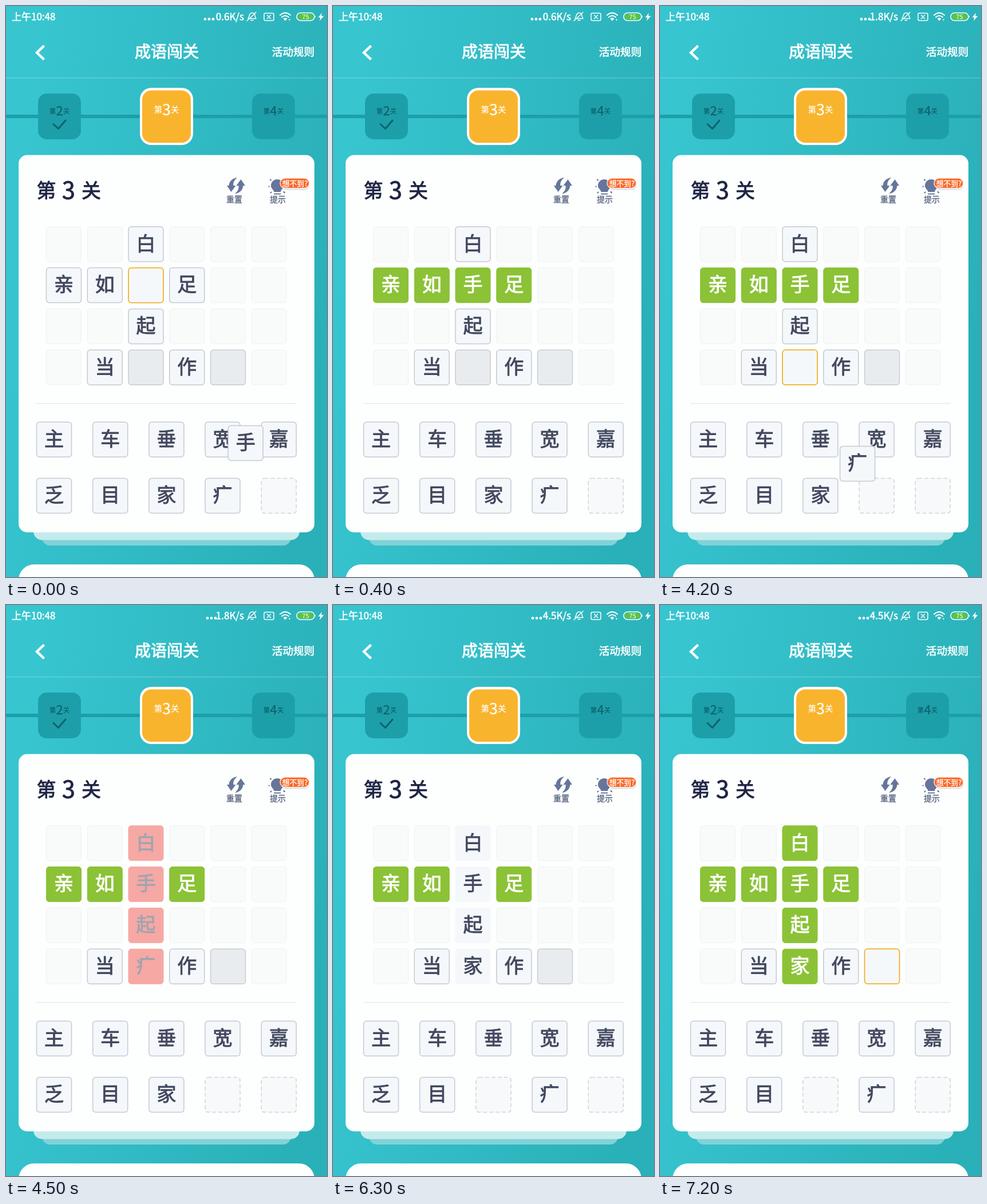
Animation of 561 by 998 pixels, one loop 8 s. Source, as an HTML page:

```html
<!DOCTYPE html>
<html lang="zh-CN">
<head>
<meta charset="utf-8">
<title>成语闯关</title>
<style>
html, body { margin: 0; width: 100%; height: 100%; overflow: hidden; background: #31bbc5; }
svg { display: block; width: 100vw; height: 100vh; }
text { font-family: "Noto Sans CJK SC", "Noto Sans CJK", "Noto Sans SC", sans-serif; font-weight: 400; }
.mid { text-anchor: middle; }
.medium { stroke: currentColor; fill: currentColor; stroke-width: .6; }
.glyph { font-size: 34px; text-anchor: middle; stroke-width: .9; }
.line { fill: none; stroke-linecap: round; stroke-linejoin: round; }
</style>
</head>
<body>
<svg viewBox="0 0 561 998" preserveAspectRatio="none">
  <defs>
    <linearGradient id="sea" gradientUnits="userSpaceOnUse" x1="0" y1="460" x2="561" y2="540">
      <stop offset="0" stop-color="#37c5d0"/>
      <stop offset="1" stop-color="#2ab0b8"/>
    </linearGradient>
    <path id="arrow" d="M404 300C395 301 390 307 389.500 314H386L393.500 325 401.500 314H397.500C396.500 309 399 304 404 300Z"/>
  </defs>
  <rect width="561" height="998" fill="url(#sea)"/>

  <!-- status bar -->
  <g fill="#fff" color="#fff">
    <text class="medium" x="10" y="25" font-size="17" stroke-width=".3">上午10:48</text>
    <g id="dots"><circle cx="348" cy="23" r="2.400"/><circle cx="355" cy="23" r="2.400"/><circle cx="362" cy="23" r="2.400"/></g>
    <text id="speed" class="medium" x="416" y="25" font-size="17" text-anchor="end">0.6K/s</text>
    <g class="line" stroke="#fff" stroke-width="1.500">
      <path d="M423 22C426 19 424 12 430 12S434 18 437 22ZM428 25H432M421 26L437 11"/>
      <rect x="451" y="12.500" width="17" height="13" rx="2.500"/>
      <path d="M456.500 16L462.500 22M462.500 16L456.500 22"/>
      <path d="M479 16Q488 8 497 16M482 19.500Q488 14.500 494 19.500" stroke-width="2"/>
      <rect x="508" y="12" width="31" height="13.500" rx="6.700"/>
    </g>
    <path d="M484.500 22Q488 19 491.500 22L488 26ZM540 16.500Q542 18.700 540 21ZM552 12L545.500 20H549.500L548 26 555.500 17.500H551Z"/>
    <path d="M494 23L495.500 26 497 23Z"/>
    <rect x="510" y="14" width="27" height="9.500" rx="4.700" fill="#5cc53a"/>
    <text class="mid" x="523.500" y="23" font-size="11" font-weight="700">75</text>
  </g>

  <!-- header -->
  <g fill="#fff" color="#fff">
    <path class="line" d="M66.500 69.500L54 81.500 66.500 93.500" stroke="#fff" stroke-width="4.500" style="stroke-linecap:butt;stroke-linejoin:miter"/>
    <text class="medium mid" x="281" y="90" font-size="28" style="stroke-width:.9">成语闯关</text>
    <text class="medium mid" x="502" y="87" font-size="18.600">活动规则</text>
    <rect y="125" width="561" height="1.300" opacity=".25"/>
  </g>

  <!-- levels -->
  <g fill="#1d9fa9">
    <rect y="190" width="561" height="6"/>
    <rect x="56" y="153" width="75" height="80" rx="15"/>
    <rect x="430" y="153" width="75" height="80" rx="15"/>
  </g>
  <rect x="234" y="143" width="93" height="100" rx="20" fill="#fff"/>
  <rect x="238" y="147.500" width="85" height="91.500" rx="16" fill="#f9b42d"/>
  <g id="levels"></g>
  <path class="line" d="M83 206.500L91.500 214.500 104 200" stroke="#0d626c" stroke-width="3"/>

  <!-- cards -->
  <rect x="63" y="900" width="435" height="43" rx="14" fill="#80d2d7"/>
  <rect x="48" y="890" width="465" height="43.500" rx="15" fill="#c4ebec"/>
  <rect x="22" y="260.500" width="517" height="659.500" rx="15" fill="#fdfffe"/>
  <rect x="22" y="976" width="517" height="60" rx="27" fill="#fdfffe"/>

  <g color="#1f2544" class="mid">
    <text class="medium" x="70.500" y="334.500" font-size="34" style="stroke-width:.9">第</text>
    <text class="medium" x="109.500" y="336.500" font-size="41" style="stroke-width:.9">3</text>
    <text class="medium" x="149" y="334.500" font-size="34" style="stroke-width:.9">关</text>
  </g>

  <g fill="#66759a">
    <use href="#arrow"/>
    <use href="#arrow" transform="rotate(180 402 314)"/>
    <path d="M463 314A11 11 0 0 1 485 314C485 319 480.500 321 480 325H468.500C468 321 463 319 463 314Z"/>
    <path class="line" d="M469 328.500H479.500M460 315.500H459.500M463 304.500L462 303.500M463.500 325.500L462.500 326.500M485.500 325L487 326" stroke="#66759a" stroke-width="2.200"/>
  </g>
  <g color="#56617f" class="mid">
    <text class="medium" x="399" y="343" font-size="14" style="stroke-width:.3">重置</text>
    <text class="medium" x="475" y="343" font-size="14" style="stroke-width:.3">提示</text>
  </g>
  <rect x="480" y="303.500" width="51" height="18" rx="9" fill="#5a6480" opacity=".18"/>
  <rect x="479" y="301" width="51" height="17.500" rx="8.700" fill="#fa6826" stroke="#fff" stroke-width="1.200"/>
  <text class="medium mid" x="505" y="314.500" font-size="12.800" color="#fff" style="stroke-width:.3">想不到?</text>

  <rect x="53" y="694" width="455" height="1.300" fill="#e4e7e9"/>
  <g id="board"></g>
</svg>

<script>
const LOOP = 8000, STEP = 100;
const INK = '#43485f', PAPER = '#f5f8fb', GREEN = '#8bc236', RED = '#f6584c';
const SIZE = 61;
const $ = id => document.getElementById(id);

const grid = ['  白   ', '亲如.足  ', '  起   ', ' 当.作. '];
const tray = '主车垂宽嘉乏目家疒手';
const cellAt = i => [101 + i % 6 * 71.76, 416.3 + Math.floor(i / 6) * 71.8];
const slotAt = i => [84 + i % 5 * 98.2, 757.8 + Math.floor(i / 5) * 98.2];

// Each move: a tile leaves its slot, fills a cell and judges a line of cells.
const moves = [
  { start: 0, slot: 9, cell: 8, line: [6, 7, 8, 9], color: GREEN },
  { start: 4200, slot: 8, cell: 20, line: [2, 8, 14, 20], color: RED, back: 5300 },
  { start: 6100, slot: 7, cell: 20, line: [2, 8, 14, 20], color: GREEN }
];
const picks = [[0, 8], [1400, 20], [7200, 22]];
const speeds = [[0, '0.6K/s', 0], [2100, '1.8K/s', 4], [6100, '4.5K/s', 1]];
const flight = [.25, .75];

const latest = (list, t) => list.filter(e => e[0] <= t).pop();

function mix(a, b, k) {
  const part = (c, i) => parseInt(c.substr(i, 2), 16);
  return `rgb(${[1, 3, 5].map(i => Math.round(part(a, i) + (part(b, i) - part(a, i)) * k))})`;
}

const looks = {
  empty: ['#f9fbfa', '#f1f3f3', 1.2],
  tile: [PAPER, '#c5c9d2', 1.5],
  blank: ['#e9ecef', '#c8ccd3', 1.5],
  pick: [PAPER, '#f4b02c', 1.8],
  hole: ['#f7f9fa', '#d0d3d9', 1.5, '7 4']
};

function tile([x, y], look, ch = '', ink = INK) {
  const [fill, stroke, width, dash = 'none'] = look;
  const box = `<rect x="${x - SIZE / 2}" y="${y - SIZE / 2}" width="${SIZE}" height="${SIZE}" rx="5"
    fill="${fill}" stroke="${stroke}" stroke-width="${width}" stroke-dasharray="${dash}"/>`;
  return ch ? box + `<text class="glyph" x="${x}" y="${y + 11.3}" fill="${ink}" stroke="${ink}">${ch}</text>` : box;
}

function draw(t) {
  const cells = [...grid.join('')].map(ch =>
    ch === ' ' ? [looks.empty] : ch === '.' ? [looks.blank] : [looks.tile, ch]);
  const slots = [...tray].map(ch => [looks.tile, ch]);
  const pick = latest(picks, t)[1];
  cells[pick] = [looks.pick];
  let flying = '';

  for (const m of moves) {
    if (t < m.start || t >= m.back + 2 * STEP) continue;
    const back = t >= m.back;
    const n = Math.floor((t - (back ? m.back : m.start)) / STEP);
    const ch = tray[m.slot];
    slots[m.slot] = [looks.hole];
    if (n < flight.length) {
      const k = back ? 1 - flight[n] : flight[n];
      const from = slotAt(m.slot), to = cellAt(m.cell);
      flying = tile(from.map((v, i) => v + (to[i] - v) * k), looks.tile, ch);
    } else {
      const k = Math.min((n - flight.length) / 2, 1);
      const fill = mix(PAPER, m.color, k);
      cells[m.cell] = [looks.tile, ch];
      for (const i of m.line) cells[i] = [[fill, fill, 1], cells[i][1], mix(INK, '#ffffff', k)];
    }
  }

  $('board').innerHTML =
    cells.map((c, i) => tile(cellAt(i), ...c)).join('') +
    slots.map((s, i) => tile(slotAt(i), ...s)).join('') + flying;

  const [, rate, shift] = latest(speeds, t);
  $('speed').textContent = rate;
  $('dots').setAttribute('transform', `translate(${shift})`);
}

function level(x, n, small, big, color) {
  const gap = small / 2 + big * .29;
  const part = (dx, y, size, s) =>
    `<text class="medium mid" x="${x + dx}" y="${y}" font-size="${size}" style="stroke-width:.25">${s}</text>`;
  const y = 180.8 + (small < 12 ? 3 : 0);
  return `<g color="${color}">` + part(-gap, y + small * .38, small, '第') +
    part(0, 191, big, n) + part(gap, y + small * .38, small, '关') + '</g>';
}
$('levels').innerHTML = level(93.5, 2, 11, 22, '#0d626c') +
  level(280.5, 3, 14, 27, '#fff') + level(467.5, 4, 11, 22, '#0d626c');

let shown = -1;
const began = performance.now();
function tick() {
  const step = Math.floor((performance.now() - began) % LOOP / STEP);
  if (step !== shown) draw((shown = step) * STEP);
  requestAnimationFrame(tick);
}
tick();
</script>
</body>
</html>
```
